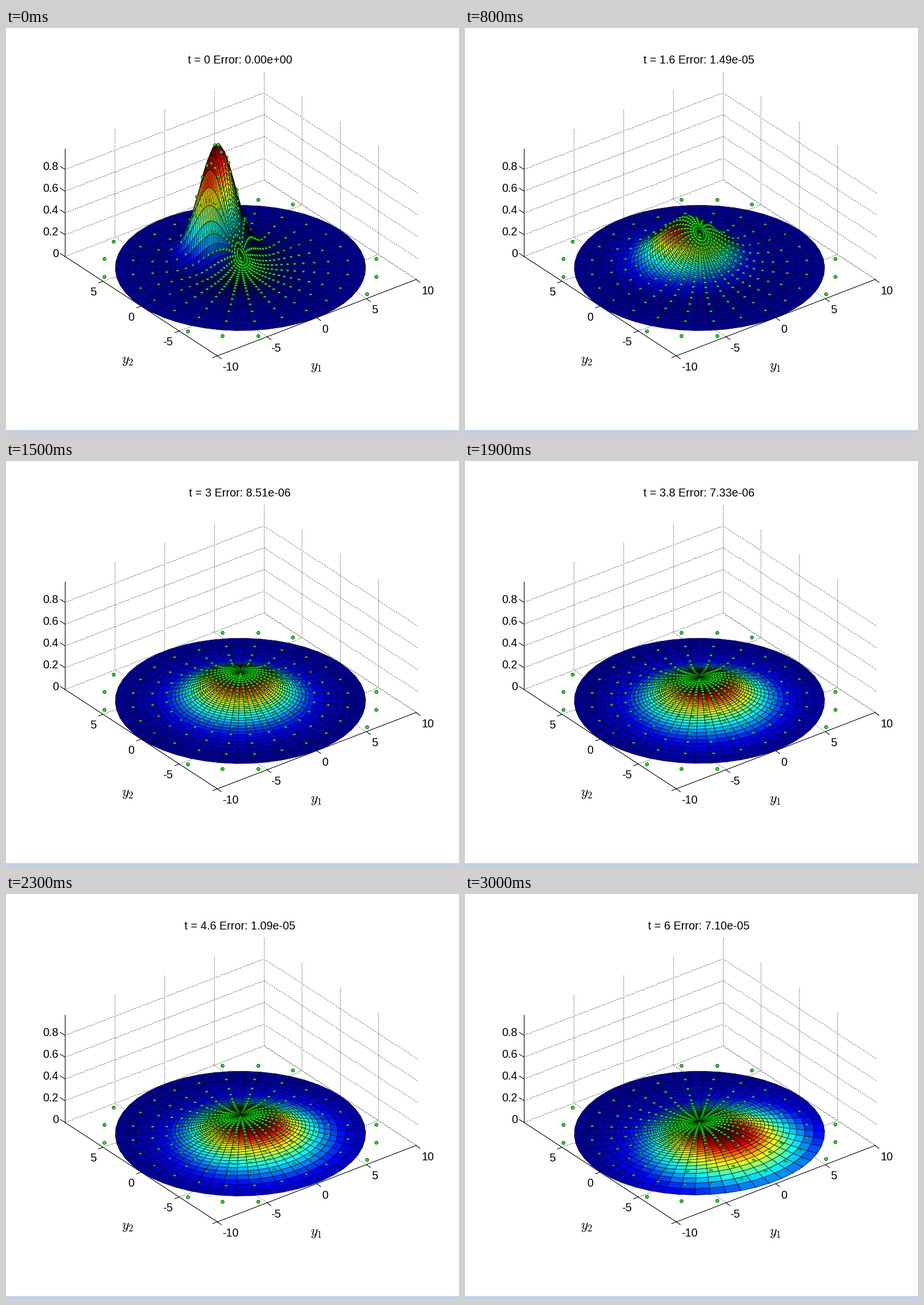
Recreate the animation shown at these times as a matplotlib script. Size 792 by 707 pixels, loop 3.1 s.

```python
import numpy as np
import matplotlib.pyplot as plt
from matplotlib.animation import FuncAnimation
from matplotlib.collections import PolyCollection
from matplotlib.patches import Rectangle

W, H, DPI = 792, 707, 64
PX = 72 / DPI                      # points per pixel
FRAMES, INTERVAL = 31, 100

# Orthographic view: azimuth -37.5, elevation 30
CX, CY = 409.4, 418.4
SCALE, Z_SCALE = 21.89, 190
COS, SIN = np.cos(np.radians(37.5)), np.sin(np.radians(37.5))
Z_TOP = 0.99

plt.rcParams["font.family"] = "Liberation Sans"
plt.rcParams["mathtext.fontset"] = "cm"


def turn(y1, y2):
    return y1 * COS - y2 * SIN, y1 * SIN + y2 * COS


def unturn(vx, vy):
    return vx * COS + vy * SIN, vy * COS - vx * SIN


def project(y1, y2, z=0.0):
    vx, vy = turn(y1, y2)
    return CX + SCALE * vx, CY - SCALE / 2 * vy - Z_SCALE * z


def density(y1, y2, t):
    """Spreading Gaussian that drifts along -y2."""
    s = 1 + t
    return np.exp(-(y1 ** 2 + (y2 - 3 + t) ** 2) / (4 * s)) / s


def jet(v):
    x = (np.clip(np.floor(v * 64), 0, 63) + 1) / 64
    return np.stack([np.clip(1.5 - np.abs(4 * x - c), 0, 1)
                     for c in (3, 2, 1)], axis=-1)


# Surface mesh, radii stretched by a tangent map
MAP_L, R_MAX, N_R, N_A = 3.0, 10.0, 50, 50
STEP_R = np.arctan(R_MAX / MAP_L) / N_R
STEP_A = 2 * np.pi / N_A
rr, aa = np.meshgrid(MAP_L * np.tan(np.arange(N_R + 1) * STEP_R),
                     np.arange(N_A + 1) * STEP_A, indexing="ij")
G1, G2 = rr * np.cos(aa), rr * np.sin(aa)


def cells(a):
    """Four corners of every mesh cell."""
    return np.stack([a[:-1, :-1], a[1:, :-1], a[1:, 1:], a[:-1, 1:]], axis=-1)


def mesh_index(y1, y2):
    u = np.arctan(np.hypot(y1, y2) / MAP_L) / STEP_R
    v = np.arctan2(y2, y1) % (2 * np.pi) / STEP_A
    i = np.clip(u.astype(int), 0, N_R - 1)
    j = np.clip(v.astype(int), 0, N_A - 1)
    return u, v, i, j


def facet_height(z, y1, y2):
    u, v, i, j = mesh_index(y1, y2)
    a, b = u - i, v - j
    h = ((1 - a) * ((1 - b) * z[i, j] + b * z[i, j + 1])
         + a * ((1 - b) * z[i + 1, j] + b * z[i + 1, j + 1]))
    return np.where(u > N_R, -9.0, h)


# Collocation points
ring, spoke = np.meshgrid(np.arange(1, 24), np.arange(24))
dot_r = MAP_L / np.tan(np.pi * ring / 47)
dot_a = spoke * np.pi / 12
D1, D2 = (dot_r * np.cos(dot_a)).ravel(), (dot_r * np.sin(dot_a)).ravel()
inside = (np.abs(D1) <= 10) & (np.abs(D2) <= 10)
D1, D2 = D1[inside], D2[inside]
N_DOT = len(D1)

PHI = np.linspace(0, 2 * np.pi, 24, endpoint=False)
FRACTIONS = np.linspace(0, 1, 7)


def dot_shapes(z, t, radius):
    """Screen-facing discs, cut where they dip below the surface."""
    height = density(D1, D2, t)
    reach = radius * FRACTIONS[:, None]
    ox, up = reach * np.cos(PHI), reach * np.sin(PHI)
    vx, vy = turn(D1, D2)
    q1, q2 = unturn(vx[:, None, None] + ox / SCALE,
                    vy[:, None, None] + 0.5 * up / SCALE)
    qz = height[:, None, None] + 0.75 * up / Z_SCALE
    above = qz > facet_height(z, q1, q2) - 0.001
    rho = radius * np.max(above * FRACTIONS[:, None], axis=1)
    px, py = project(D1, D2, height)
    return np.stack([px[:, None] + rho * np.cos(PHI),
                     py[:, None] - rho * np.sin(PHI)], axis=-1)


# Back to front order, the same at all times
cell_key = cells(turn(G1, G2)[1]).mean(axis=-1)
_, _, di, dj = mesh_index(D1, D2)
dot_vy = turn(D1, D2)[1]
on_disc = np.hypot(D1, D2) <= R_MAX
dot_key = np.where(on_disc, np.minimum(dot_vy, cell_key[di, dj]), dot_vy) - 0.2
order = np.argsort(-np.concatenate([cell_key.ravel(), dot_key, dot_key - 1e-6]),
                   kind="stable")

fig = plt.figure(figsize=(W / DPI, H / DPI), dpi=DPI, facecolor="white")
ax = fig.add_axes([0, 0, 1, 1])
ax.set_xlim(-0.5, W - 0.5)
ax.set_ylim(H - 0.5, -0.5)
ax.axis("off")


def dotted(p, q, pitch=3):
    (x0, y0), (x1, y1) = p, q
    length = max(abs(x1 - x0), abs(y1 - y0))
    k = np.arange(0, length + 0.5, pitch) / length
    ax.plot(np.round(x0 + (x1 - x0) * k), np.round(y0 + (y1 - y0) * k),
            "k,", zorder=1)


def solid(p, q):
    ax.plot([p[0], q[0]], [p[1], q[1]], color="black", lw=1.1 * PX, zorder=2)


def label(x, y, s, ha="center", size=19.7):
    return ax.text(x, y, s, ha=ha, va="baseline", fontsize=size * PX,
                   color="black", zorder=5)


def tick(p, dx, dy):
    solid(p, (p[0] + dx, p[1] + dy))


# Grid on floor and back walls
for v in (-5, 0, 5):
    dotted(project(v, -10), project(v, 10))
    dotted(project(-10, v), project(10, v))
    dotted(project(v, 10, Z_TOP), project(v, 10))
    dotted(project(10, v, Z_TOP), project(10, v))
dotted(project(10, 10, Z_TOP), project(10, 10))
for z in (0, 0.2, 0.4, 0.6, 0.8):
    dotted(project(-10, 10, z), project(10, 10, z))
    dotted(project(10, 10, z), project(10, -10, z), 3 if z else 2)

# Axes, ticks and labels
solid(project(-10, -10), project(10, -10))
solid(project(-10, -10), project(-10, 10))
solid(project(-10, 10), project(-10, 10, Z_TOP))
for v in (-10, -5, 0, 5, 10):
    p = project(v, -10)
    tick(p, 7, 5)
    label(p[0] + (23 if v == -10 else 21 if v == 10 else 16 if v < 0 else 14.5),
          p[1] + 26, str(v))
for v in (-10, -5, 0, 5):
    p = project(-10, v)
    tick(p, -8, 3)
    if v > -10:
        label(p[0] - (20 if v < 0 else 17), p[1] + 25, str(v))
for z in (0, 0.2, 0.4, 0.6, 0.8):
    p = project(-10, 10, z)
    tick(p, -8, -5)
    label(91.5, p[1] + 1, f"{z:g}", ha="right")
label(532, 595.5, "$y_1$", ha="left", size=24)
label(202, 584.5, "$y_2$", ha="left", size=24)
ax.add_patch(Rectangle((-1, 701.5), W + 2, 6, fc="#b8d1ef", ec="none"))

title = label(408.7, 61, "")
n_cells = N_R * N_A
widths = np.r_[np.full(n_cells, 0.7 * PX), np.zeros(2 * N_DOT)][order]
surface = PolyCollection([], linewidths=widths, edgecolors="black", zorder=3)
surface.set_snap(False)
ax.add_collection(surface, autolim=False)

ERR_T = [0.2, 0.8, 2.2, 3, 3.8, 4.6, 6]
ERR_V = [4.6e-5, 2.42e-5, 1.03e-5, 8.51e-6, 7.33e-6, 1.09e-5, 7.10e-5]


def error_at(t):
    return np.exp(np.interp(t, ERR_T, np.log(ERR_V))) if t else 0.0


def update(n):
    t = 0.2 * n
    z = density(G1, G2, t)
    sx, sy = project(G1, G2, z)
    quads = np.stack([cells(sx), cells(sy)], axis=-1).reshape(n_cells, 4, 2)
    shapes = [*quads, *dot_shapes(z, t, 3.2), *dot_shapes(z, t, 2.5)]
    level = (z[:-1, :-1] - z.min()) / (z.max() - z.min())
    colors = np.concatenate([jet(level).reshape(-1, 3),
                             np.zeros((N_DOT, 3)),
                             np.tile([0.0, 1.0, 0.0], (N_DOT, 1))])
    surface.set_verts([shapes[k] for k in order])
    surface.set_facecolor(colors[order])
    title.set_text(f"t = {t:g} Error: {error_at(t):.2e}")
    return surface, title


anim = FuncAnimation(fig, update, frames=FRAMES, interval=INTERVAL,
                     repeat=True, repeat_delay=0)
plt.show()
```
